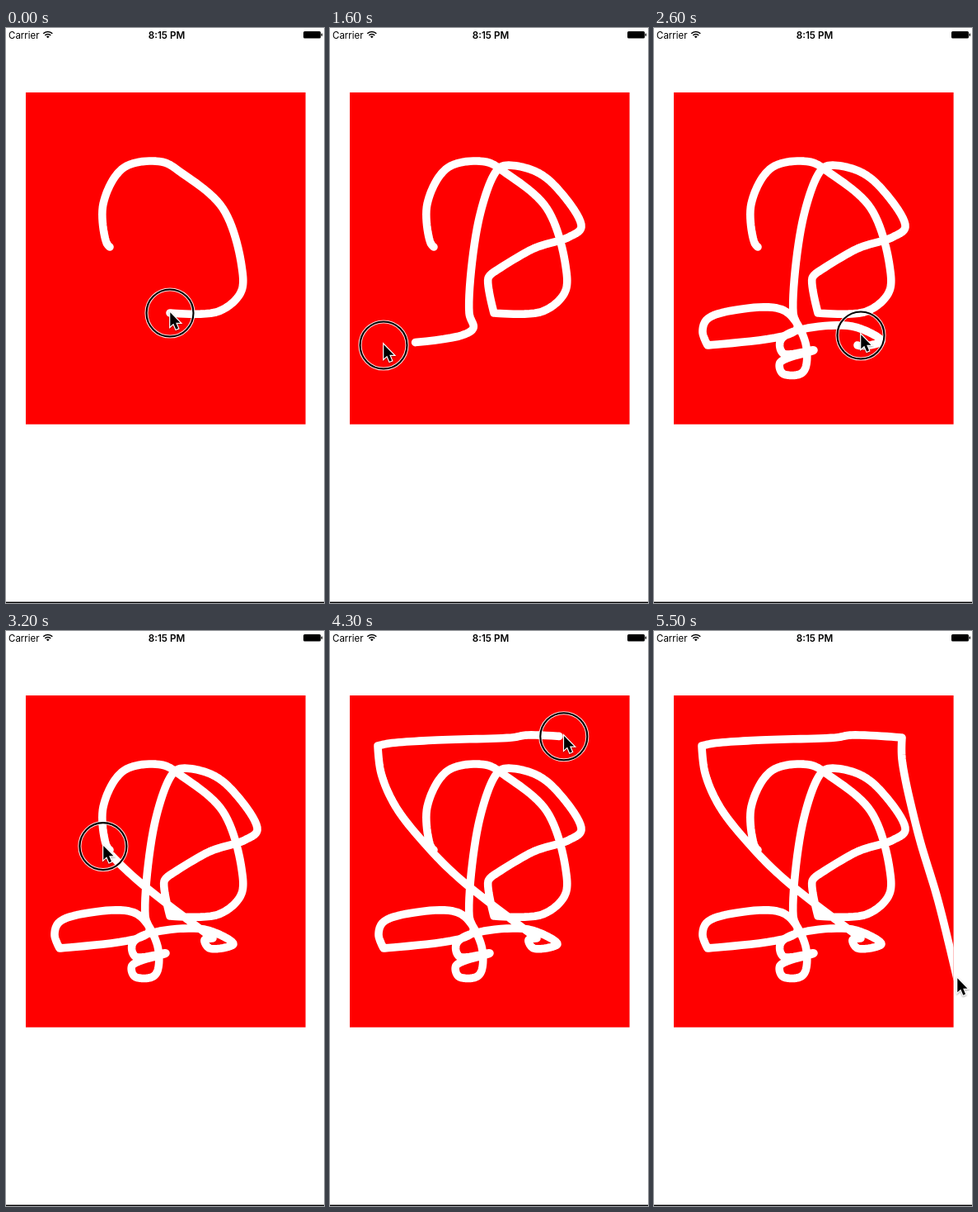
These frames come from a looping animation (386 px wide and 696 px high, 5.6 s). An HTML page with a canvas:

```html
<!DOCTYPE html>
<html lang="en">
<head>
<meta charset="utf-8">
<title>Finger drawing</title>
<style>
  html, body { margin: 0; width: 100%; height: 100%; overflow: hidden; background: #fff; }
  canvas { display: block; width: 386px; height: 696px; }
</style>
</head>
<body>
<canvas id="stage"></canvas>
<script>
const W = 386, H = 696, STEP = 100, LOOP = 5600;
const LAG = 0.42 * STEP, RELEASE = 5300;
const VIEW = [24, 78, 339.6, 401.7];
const canvas = document.getElementById('stage');
const ctx = canvas.getContext('2d');
const dpr = window.devicePixelRatio || 1;
canvas.width = W * dpr;
canvas.height = H * dpr;

const linear = x => x;
const easeIn = x => x ** 1.3;
const easeOut = x => 1 - (1 - x) ** 2.2;

const samples = [];
let total = 0;

function addSample(x, y) {
  const p = samples[samples.length - 1];
  if (p) total += Math.hypot(x - p.x, y - p.y);
  samples.push({ x, y, at: total });
}

// Samples a centripetal spline through the points
function spline(pts) {
  const gap = i => Math.sqrt(Math.hypot(pts[i + 1][0] - pts[i][0], pts[i + 1][1] - pts[i][1]));
  const slope = (i, k) => {
    if (i === 0 || i === pts.length - 1) return 0;
    const a = pts[i - 1][k], b = pts[i][k], c = pts[i + 1][k];
    const d0 = gap(i - 1), d1 = gap(i);
    return (b - a) / d0 - (c - a) / (d0 + d1) + (c - b) / d1;
  };
  for (let i = 0; i < pts.length - 1; i++) {
    for (let n = 0; n <= 12; n++) {
      const s = n / 12, s2 = s * s, s3 = s2 * s, d = gap(i);
      addSample(...[0, 1].map(k =>
        (2 * s3 - 3 * s2 + 1) * pts[i][k] + (s3 - 2 * s2 + s) * d * slope(i, k) +
        (3 * s2 - 2 * s3) * pts[i + 1][k] + (s3 - s2) * d * slope(i + 1, k)));
    }
  }
}

// One movement of the finger; each leg starts where the previous one ended
function leg(from, to, ease, ...pts) {
  const before = total, end = samples[samples.length - 1];
  spline(end ? [[end.x, end.y], ...pts] : pts);
  return { from, to, ease, length: total - before };
}

const legs = [
  leg(-400, -200, linear, [126, 265], [122, 260], [118, 213], [143, 169], [189, 162], [214, 176],
    [263, 218], [286, 288], [285, 320], [258, 343], [199, 345]),
  leg(300, 800, linear, [192, 303], [198, 296]),
  leg(800, 1600, easeIn, [247, 267], [290, 253], [305, 241], [270, 188], [243, 171], [210, 167],
    [200, 176], [180, 235], [169, 345], [174, 363], [160, 372], [65, 384]),
  leg(1600, 2600, linear, [59, 368], [64, 353], [95, 342], [158, 342], [183, 378], [184, 411],
    [177, 419], [156, 418], [153, 405], [194, 390], [157, 394], [153, 380], [165, 369],
    [240, 361], [276, 379], [247, 384], [241, 374], [251, 372]),
  leg(2700, 3600, linear, [160, 302], [121, 264], [80, 213], [62, 172], [58, 139]),
  leg(3600, 4600, easeOut, [72, 136], [130, 132], [220, 129], [240, 126], [301, 129]),
  leg(4600, 5100, linear, [301, 155], [320, 243], [345, 327], [368, 421])
];

const clamp01 = x => Math.max(0, Math.min(1, x));
const travelled = t => legs.reduce(
  (sum, l) => sum + l.length * l.ease(clamp01((t - l.from) / (l.to - l.from))), 0);

function pointAt(length) {
  const i = samples.findIndex(p => p.at >= length);
  if (i < 0) return samples[samples.length - 1];
  if (i === 0) return samples[0];
  const a = samples[i - 1], b = samples[i];
  const f = (length - a.at) / (b.at - a.at);
  return { x: a.x + (b.x - a.x) * f, y: a.y + (b.y - a.y) * f };
}

function drawStroke(length) {
  const tip = pointAt(length);
  ctx.save();
  ctx.beginPath();
  ctx.rect(...VIEW);
  ctx.clip();
  ctx.beginPath();
  for (const p of samples) {
    if (p.at > length) break;
    ctx.lineTo(p.x, p.y);
  }
  ctx.lineTo(tip.x, tip.y);
  ctx.lineWidth = 9.6;
  ctx.lineCap = ctx.lineJoin = 'round';
  ctx.strokeStyle = '#fff';
  ctx.stroke();
  ctx.restore();
}

function ring(x, y, r, width, color) {
  ctx.beginPath();
  ctx.arc(x, y, r, 0, Math.PI * 2);
  ctx.lineWidth = width;
  ctx.strokeStyle = color;
  ctx.stroke();
}

const arrow = new Path2D('M0 0V17L4 13.4L7 20.4L9.8 19.2L6.9 12.4H12.2Z');

function drawPointer({ x, y }, pressed) {
  if (pressed) {
    ring(x, y, 28.5, 4.2, 'rgba(255,255,255,.85)');
    ring(x, y, 28.5, 2.1, '#000');
  }
  ctx.save();
  ctx.translate(x + 0.3, y - 0.7);
  ctx.shadowColor = 'rgba(0,0,0,.35)';
  ctx.shadowBlur = 2 * dpr;
  ctx.shadowOffsetY = dpr;
  ctx.lineWidth = 2.4;
  ctx.lineJoin = 'miter';
  ctx.strokeStyle = '#fff';
  ctx.stroke(arrow);
  ctx.shadowColor = 'transparent';
  ctx.fillStyle = '#000';
  ctx.fill(arrow);
  ctx.restore();
}

function drawWifi(x, y) {
  const from = -Math.PI * 0.75, to = -Math.PI * 0.25;
  ctx.lineWidth = 1.6;
  ctx.lineCap = 'butt';
  ctx.strokeStyle = '#000';
  for (const r of [4.8, 7.8]) {
    ctx.beginPath();
    ctx.arc(x, y, r, from, to);
    ctx.stroke();
  }
  ctx.beginPath();
  ctx.moveTo(x, y);
  ctx.arc(x, y, 2.6, from, to);
  ctx.fill();
}

function drawStatusBar() {
  ctx.fillStyle = '#000';
  ctx.textBaseline = 'alphabetic';
  ctx.textAlign = 'left';
  ctx.font = '400 11.5px Inter, Roboto, sans-serif';
  ctx.fillText('Carrier', 3, 13);
  ctx.textAlign = 'center';
  ctx.font = '600 11.7px Inter, Roboto, sans-serif';
  ctx.fillText('8:15 PM', 195, 13);
  drawWifi(50.8, 12.3);
  ctx.beginPath();
  ctx.roundRect(361, 4, 21, 8.4, 1.5);
  ctx.roundRect(382.6, 6.6, 1.4, 3.2, 0.6);
  ctx.fill();
}

function draw(t) {
  ctx.setTransform(dpr, 0, 0, dpr, 0, 0);
  ctx.fillStyle = '#fff';
  ctx.fillRect(0, 0, W, H);
  drawStatusBar();
  ctx.fillRect(0, 694.6, W, 1.4);
  ctx.fillStyle = '#f00';
  ctx.fillRect(...VIEW);
  drawStroke(travelled(t - LAG));
  drawPointer(pointAt(travelled(t)), t < RELEASE);
}

const start = performance.now();
function tick() {
  const t = (performance.now() - start) % LOOP;
  draw(Math.floor(t / STEP) * STEP);
  requestAnimationFrame(tick);
}
tick();
</script>
</body>
</html>
```
